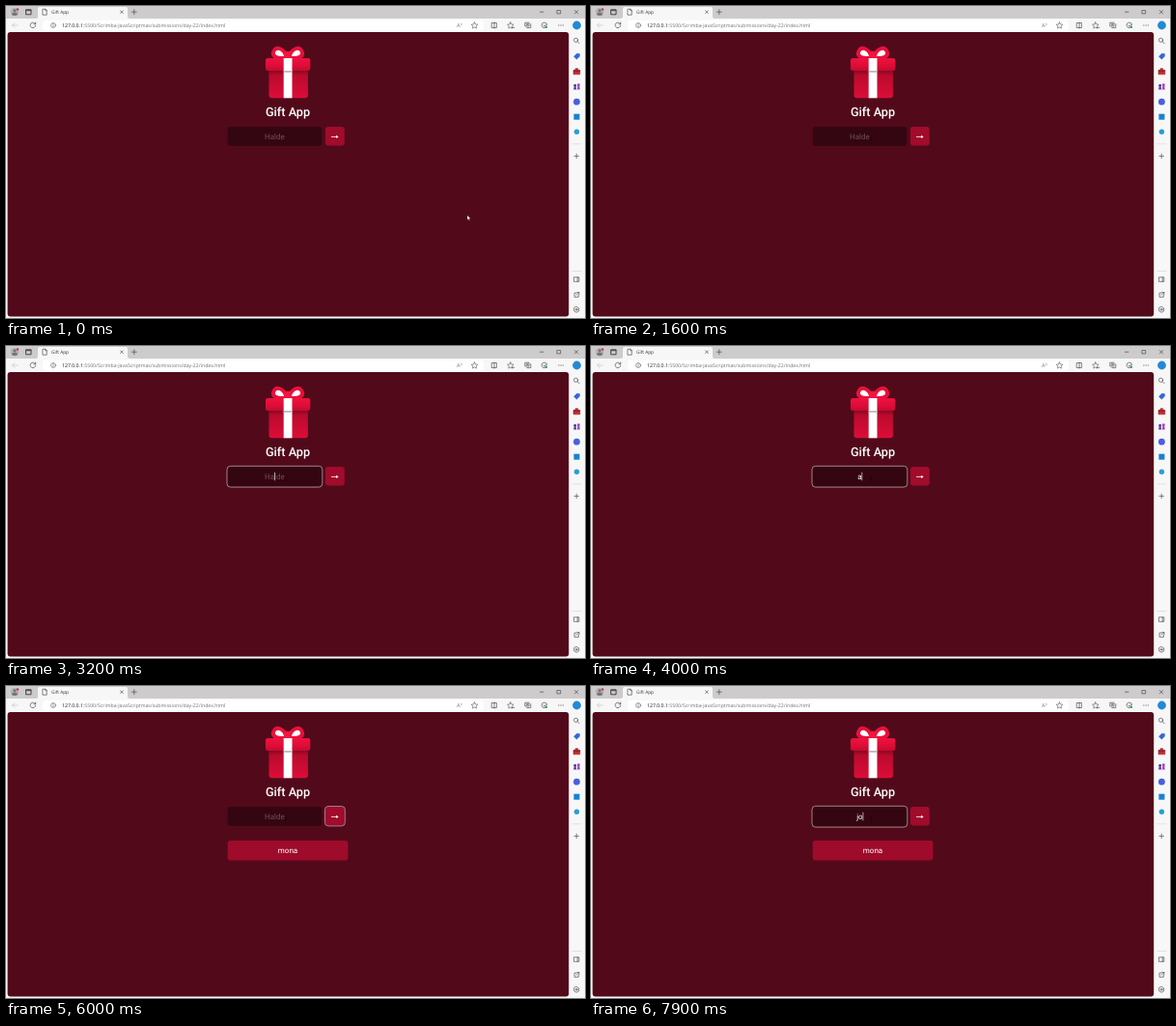
These frames come from a looping animation (600 by 323 pixels, 8 s). An HTML page:

```html
<!DOCTYPE html>
<html lang="en">
<head>
<meta charset="utf-8">
<title>Gift App</title>
<style>
html, body { margin: 0; width: 100%; height: 100%; overflow: hidden; }
svg { display: block; width: 600px; height: 323px; }
text { text-rendering: geometricPrecision; }
.ui { font-family: "Open Sans", sans-serif; }
.app { font: 8px Roboto, sans-serif; fill: #fff; text-anchor: middle; }
.line { fill: none; stroke: #444; stroke-width: .65; stroke-linecap: round; stroke-linejoin: round; }
.ring { fill: none; stroke: #bdb3b6; stroke-width: .7; }
</style>
</head>
<body>
<svg viewBox="0 0 600 323">
  <defs>
    <linearGradient id="lid" x2="0" y2="1">
      <stop stop-color="#ee123f"/><stop offset=".6" stop-color="#de0d38"/><stop offset="1" stop-color="#c50a30"/>
    </linearGradient>
    <linearGradient id="box" x2="0" y2="1">
      <stop stop-color="#7d0a20"/><stop offset=".2" stop-color="#bb0a2d"/><stop offset="1" stop-color="#dc0d38"/>
    </linearGradient>
  </defs>

  <!-- browser frame -->
  <rect width="600" height="323" fill="#f7f7f7"/>
  <rect width="600" height="13" fill="#cdcbcc"/>
  <path d="M31 13q2 0 2-2V3q0-2 2-2h89q2 0 2 2v8q0 2 2 2z" fill="#f7f7f7"/>
  <rect x="38" y="14.8" width="457" height="10.6" rx="3" fill="#fff"/>
  <rect x="1.6" y="27" width="581.6" height="294.6" rx="3" fill="#520a1a"/>

  <g class="ui">
    <text x="47" y="7.9" font-size="4.75" fill="#333">Gift App</text>
    <text x="58" y="21.9" font-size="5.18" fill="#6f6f6f"><tspan fill="#111">127.0.0.1</tspan>:5500/Scrimba-JavaScriptmas/submissions/day-22/index.html</text>
    <text x="467" y="22" font-size="5.5" fill="#777">A<tspan font-size="3.5" dy="-2">))</tspan></text>
  </g>

  <circle cx="9" cy="6.2" r="4.1" fill="#b4b1b3"/>
  <circle cx="9" cy="4.8" r="1.6" fill="#77727a"/>
  <path d="M6 9q0-2.3 3-2.3t3 2.3q-3 2-6 0z" fill="#77727a"/>
  <circle cx="12" cy="3.4" r="1.2" fill="#c4314b"/>

  <g class="line">
    <path d="M21 3.8h5v5h-5zM21 4.7h5" stroke-width="1"/>
    <path d="M38.3 3.2h2.5l1.4 1.4v4.6h-3.9zM40.8 3.2v1.5h1.4"/>
    <path d="M118.6 4.8l2.8 2.8m0-2.8l-2.8 2.8M130.3 6.2h5m-2.5-2.5v5"/>
    <path d="M553.4 6.2h3.6M571.3 4.5h3.4v3.4h-3.4zM589.3 4.5l3.4 3.4m0-3.4l-3.4 3.4"/>
    <path d="M12 20H6.5l2.4-2.4M6.5 20l2.4 2.4" stroke="#c2c2c2"/>
    <path d="M30.4 18.6a2.8 2.8 0 1 0 .3 1.6M30.7 17v1.8h-1.8"/>
    <circle cx="49" cy="20" r="2.5" stroke-width=".5"/>
    <path d="M49 19.8v1.4M49 18.6v.1" stroke-width=".6"/>
    <path id="star" d="M485.5 16.8l1 2.1 2.3.3-1.7 1.6.4 2.3-2-1.1-2 1.1.4-2.3-1.7-1.6 2.3-.3z" stroke-width=".55"/>
    <path d="M503.6 17.5h4.8v5h-4.8zM506 17v6"/>
    <use href="#star" x="37.3"/>
    <path d="M524.4 22.3h2.4"/>
    <path d="M538.2 17.2h3.8v3.8h-3.8zM539.8 22.6h4v-4M540.1 18.2v1.8m-.9-.9h1.8"/>
    <path d="M560.6 19.3a2.8 2.8 0 1 0-2.1 3.3M557 20l1.1 1.1 2.2-2.2"/>
    <path d="M572.8 20h.1M575 20h.1M577.2 20h.1" stroke-width="1"/>
    <circle cx="590.6" cy="35.3" r="2.1"/>
    <path d="M592.2 36.9l1.9 1.9M588.9 155.4h4.6m-2.3-2.3v4.6"/>
    <path d="M588.8 280.8h5v4.5h-5zM592.2 280.8v4.5"/>
    <path d="M591 297h-2v4.3h4.3v-2M591.7 296.4h2.2v2.2M593.9 296.4l-2.8 2.8"/>
    <path d="M591.2 311.4l2.5 1.4v3l-2.5 1.4-2.5-1.4v-3z"/>
    <circle cx="591.2" cy="314.3" r=".9"/>
    <path d="M587 142.8h9M587 274.5h9" stroke="#d0d0d0" stroke-width=".6"/>
  </g>
  <circle cx="559.8" cy="21.8" r="1.3" fill="#3d9b58"/>

  <!-- side bar -->
  <circle cx="591.5" cy="20" r="4.4" fill="#2389d7"/>
  <path d="M588.2 52.2l3.4-3.3 3 .4.2 2.8-3.5 3.4z" fill="#3566dc"/>
  <path d="M588 66.4h6.8v4.4H588zM590 66.2v-1.5h2.8v1.5" fill="#c42b32" stroke="#a62a30" stroke-width=".6"/>
  <path d="M588 66.4h6.8v1.5H588z" fill="#8d2028"/>
  <path d="M588 86.5l.8-3a1.5 1.5 0 1 1 1.7 0l.8 3z" fill="#5a3ca0"/>
  <path d="M591.8 86.5l.5-3-.5-3h3l-.5 3 .5 3z" fill="#9b42c5"/>
  <circle cx="591.4" cy="99.2" r="3.4" fill="#4a5fdd"/>
  <rect x="588.4" y="111.7" width="6" height="6" fill="#1682d2"/>
  <circle cx="591.4" cy="130.3" r="2.7" fill="#28a0d8"/>

  <!-- gift -->
  <g fill="none" stroke="#e8103c" stroke-width="3.8">
    <path id="loop" d="M290.5 53.5C281 55 275 52 277.3 47C280 41.5 288 43 290.5 53z" fill="#fff"/>
    <use href="#loop" transform="matrix(-1 0 0 1 584 0)"/>
  </g>
  <rect x="288" y="46.8" width="8" height="8" rx="2" fill="#f2143f"/>
  <path d="M272.5 66h40.4v26.3q0 3-3 3h-34.4q-3 0-3-3z" fill="url(#box)"/>
  <rect x="269" y="54" width="46.3" height="13" rx="2.2" fill="url(#lid)"/>
  <path d="M287.7 54h8.8v41.3h-8.8z" fill="#fff"/>
  <path d="M287.7 67h8.8v1.8h-8.8z" fill="#c4b6bb"/>

  <!-- app -->
  <text class="app" x="292" y="114.2" style="font-size:12.7px;font-weight:500">Gift App</text>
  <rect x="229.7" y="125" width="97.6" height="20" rx="3" fill="#340611"/>
  <rect class="ring" id="inputRing" x="229" y="124.3" width="98.8" height="21.8" rx="3.6"/>
  <text class="app" id="hint" x="278.4" y="137.8" style="fill:#70505a">Halde</text>
  <text class="app" id="typed" x="278.4" y="137.8"></text>
  <rect id="caret" y="130.7" width=".6" height="8.6" fill="#fff"/>
  <rect x="331" y="125" width="19.8" height="19.4" rx="3" fill="#a10b2c"/>
  <rect class="ring" id="buttonRing" x="330.5" y="124.5" width="20.8" height="20.4" rx="3.5"/>
  <path d="M337 135.4h6" stroke="#fff" stroke-width=".8"/>
  <path d="M342.2 133.7l2.4 1.7-2.4 1.7z" fill="#fff"/>
  <g id="item">
    <rect x="229.7" y="160" width="124.7" height="20.6" rx="3" fill="#9f0b2b"/>
    <text class="app" x="292" y="172.8">mona</text>
  </g>
  <g id="mouse">
    <path id="arrow" d="M0 0v4.6l1.1-.9.8 1.7.8-.4-.8-1.6h1.5z" fill="#fff" stroke="#222" stroke-width=".3"/>
    <path id="beam" d="M0-1.5v5" stroke="#14020a" stroke-width=".6"/>
  </g>
</svg>
<script>
const $ = id => document.getElementById(id);
const show = (id, on) => $(id).style.display = on ? "" : "none";

// [time, text in the field]
const keys = [[0, ""], [3800, "a"], [4300, ""], [4500, "m"], [4700, "mo"],
  [4900, "mon"], [5100, "mona"], [5700, ""], [7400, "j"], [7700, "jo"]];
// [time, focused control]
const focus = [[0, ""], [2000, "input"], [5300, "button"], [6800, "input"]];
const latest = (list, t) => list.filter(e => e[0] <= t).pop();

function draw(t) {
  const [keyTime, text] = latest(keys, t);
  const [focusTime, control] = latest(focus, t);
  const inInput = control === "input";

  $("typed").textContent = text;
  show("hint", !text);
  show("inputRing", inInput);
  show("buttonRing", control === "button");
  show("item", t >= 5700);

  const blinkOn = (t - Math.max(keyTime, focusTime)) % 1000 < 500;
  show("caret", inInput && blinkOn);
  const width = text ? $("typed").getComputedTextLength() : 0;
  $("caret").setAttribute("x", 278.4 + width / 2);

  const p = Math.min(1, Math.max(0, (t - 300) / 1200));
  const s = p * p * (3 - 2 * p);
  const y = 216.7 - 80 * s;
  $("mouse").setAttribute("transform", `translate(${478 - 188 * s} ${y})`);
  show("arrow", y > 145);
  show("beam", y <= 145);
}

function tick() {
  draw(performance.now() % 8000);
  requestAnimationFrame(tick);
}
tick();
</script>
</body>
</html>
```
